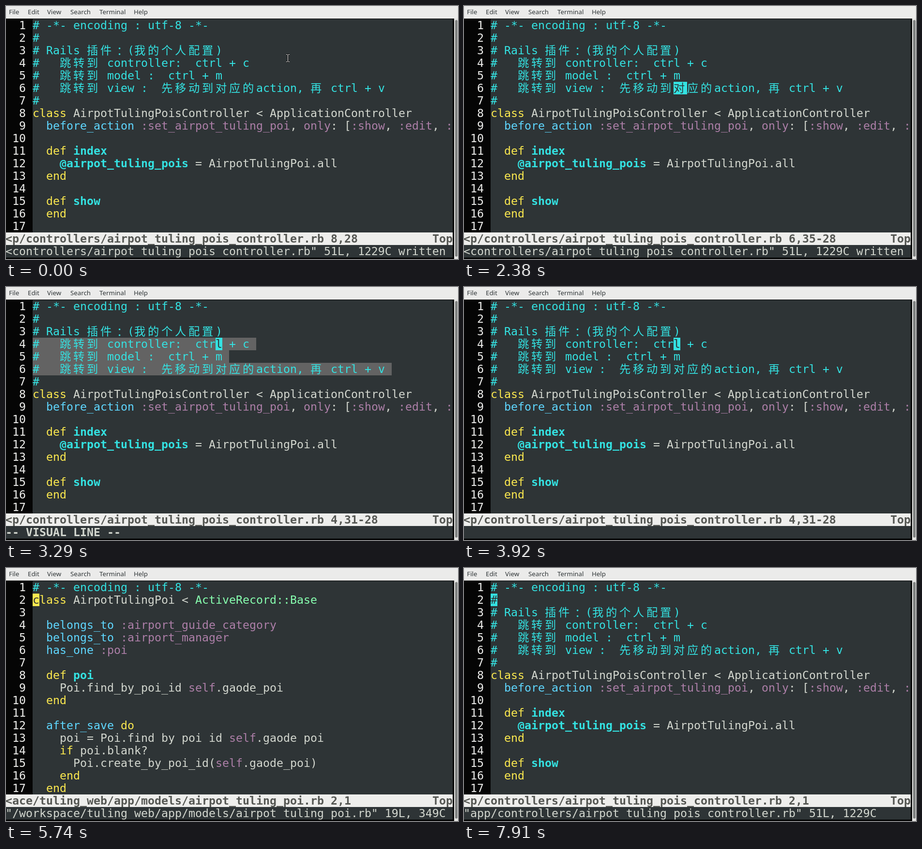
Write an HTML page that moves like this. It is 934 by 524 pixels and loops after 8 s.

```html
<!DOCTYPE html>
<html lang="zh-CN">
<head>
<meta charset="utf-8">
<title>Editor session</title>
<style>
  html, body { margin: 0; width: 100%; height: 100%; overflow: hidden; background: #050505; }
  #stage { position: relative; width: 934px; height: 524px; overflow: hidden; background: #050505; }
  #stage * { position: absolute; }
  #menu { left: 0; top: 0; width: 934px; height: 26px; background: #ebebea; color: #2e3436;
    font: 13.3px/25px "Noto Sans", sans-serif; }
  #bar { left: 926px; top: 26px; width: 8px; height: 498px; background: #e4e4e2; }
  #thumb { left: 2px; top: 3px; width: 5px; height: 490px; border-radius: 3px; background: #7c7e7d; }
  #term { left: -1px; top: 27px; width: 924px; height: 494px; overflow: hidden; background: #2e3436;
    font: 23.254px/26px "DejaVu Sans Mono", "Noto Sans CJK SC", "Noto Sans CJK JP", monospace; }
  #term span { white-space: pre; height: 26px; }
  #gutter { left: 0; top: 0; width: 56px; height: 442px; background: #050505; color: #eeeeec; }
  #status { left: 0; top: 442px; width: 924px; height: 26px; background: #eeeeec; color: #555753; font-weight: bold; }
  .pane, #marks { left: 56px; top: 0; width: 868px; height: 442px; }
  .mark { left: 0; height: 26px; background: #636363; }
  .mid { font-family: "Noto Sans CJK JP", sans-serif; }
  .w { color: #d3d7cf; }
  .c { color: #34e2e2; }
  .C { color: #34e2e2; font-weight: bold; }
  .y { color: #fce94f; }
  .b { color: #5fd7ff; }
  .p { color: #ad7fa8; }
  .g { color: #87ffaf; }
  #cursor { background: currentColor; overflow: hidden; }
  #cursor span { left: 0; top: 0; color: #2e3436; }
</style>
</head>
<body>
<div id="stage">
  <div id="menu"></div>
  <div id="bar"><div id="thumb"></div></div>
  <div id="term">
    <div id="gutter"></div>
    <div id="marks"></div>
    <div id="status"></div>
  </div>
  <svg id="mouse" style="left:576px;top:98px" width="13" height="20" fill="none">
    <path d="M3 2.5H5.5L6.5 3.5L7.5 2.5H10M6.5 3V17M3 17.5H5.5L6.5 16.5L7.5 17.5H10" stroke="#111" stroke-width="3"/>
    <path d="M3 2.5H5.5L6.5 3.5L7.5 2.5H10M6.5 3V17M3 17.5H5.5L6.5 16.5L7.5 17.5H10" stroke="#fff"/>
  </svg>
</div>
<script>
const CW = 14, RH = 26, LOOP = 8000;
const $ = id => document.getElementById(id);
const isWide = ch => ch > '\u2e7f';

function add(parent, tag, cls, x, y, text = '') {
  const el = document.createElement(tag);
  el.className = cls;
  el.style.left = x + 'px';
  el.style.top = y + 'px';
  el.textContent = text;
  return parent.appendChild(el);
}

// Each § is followed by the colour class of the run.
const files = {
  controller: {
    path: '<p/controllers/airpot_tuling_pois_controller.rb ',
    lines: [
      '§c# -*- encoding : utf-8 -*-',
      '§c#',
      '§c# Rails 插件：(我的个人配置)',
      '§c#   跳转到 controller:  ctrl + c',
      '§c#   跳转到 model :  ctrl + m',
      '§c#   跳转到 view :  先移动到对应的action, 再 ctrl + v',
      '§c#',
      '§yclass§w AirpotTulingPoisController < ApplicationController',
      '§w  §bbefore_action§w §p:set_airpot_tuling_poi§w, §ponly§w: [§p:show§w, §p:edit§w, §p:',
      '',
      '§w  §ydef§w §Cindex',
      '§w    §C@airpot_tuling_pois§w = AirpotTulingPoi.all',
      '§w  §yend',
      '',
      '§w  §ydef§w §Cshow',
      '§w  §yend',
      ''
    ]
  },
  model: {
    path: '<ace/tuling_web/app/models/airpot_tuling_poi.rb ',
    lines: [
      '§c# -*- encoding : utf-8 -*-',
      '§yclass§w AirpotTulingPoi < §gActiveRecord::Base',
      '',
      '§w  §bbelongs_to§w §p:airport_guide_category',
      '§w  §bbelongs_to§w §p:airport_manager',
      '§w  §bhas_one§w §p:poi',
      '',
      '§w  §ydef§w §Cpoi',
      '§w    Poi.find_by_poi_id §pself§w.gaode_poi',
      '§w  §yend',
      '',
      '§w  §bafter_save§w §ydo',
      '§w    poi = Poi.find by poi id §pself§w.gaode poi',
      '§w    §yif§w poi.blank?',
      '§w      Poi.create_by_poi_id(§pself§w.gaode_poi)',
      '§w    §yend',
      '§w  §yend'
    ]
  }
};

const written = '<controllers/airpot_tuling_pois_controller.rb" 51L, 1229C written';
const openModel = '"/workspace/tuling_web/app/models/airpot_tuling_poi.rb" 19L, 349C';
const openController = '"app/controllers/airpot_tuling_pois_controller.rb" 51L, 1229C';

// Only what changes is listed; the rest carries over.
const steps = [
  { t: 0, file: 'controller', pos: '8,28', msg: written, cursor: false, mouse: true, visual: 0 },
  { t: 420, cursor: true, mouse: false },
  { t: 560, pos: '9,28' },
  { t: 770, pos: '10,0-1' },
  { t: 910, pos: '11,11' },
  { t: 1610, pos: '10,0-1' },
  { t: 1750, pos: '9,28' },
  { t: 1960, pos: '8,28' },
  { t: 2100, pos: '7,1' },
  { t: 2380, pos: '6,35-28' },
  { t: 2660, msg: '-- VISUAL LINE --', visual: 6 },
  { t: 3150, pos: '5,31-28' },
  { t: 3290, pos: '4,31-28' },
  { t: 3780, msg: '', visual: 0 },
  { t: 4060, pos: '5,31-28' },
  { t: 4200, pos: '6,35-28' },
  { t: 4340, pos: '7,1' },
  { t: 4480, pos: '9,28' },
  { t: 4970, msg: openModel, cursor: false },
  { t: 5110, file: 'model', pos: '1,1', cursor: true },
  { t: 5740, pos: '2,1' },
  { t: 5950, pos: '3,0-1' },
  { t: 6160, pos: '4,1' },
  { t: 6370, pos: '5,1' },
  { t: 6510, pos: '6,1' },
  { t: 7070, msg: openController, cursor: false },
  { t: 7280, file: 'controller', pos: '1,1', cursor: true },
  { t: 7910, pos: '2,1' }
];
steps.forEach((s, i) => { steps[i] = { ...steps[i - 1], ...s }; });

// Lays one line out on the character grid and returns its cells.
function layLine(pane, line, row) {
  const cells = [];
  for (const run of line.split('§').slice(1)) {
    const cls = run[0];
    for (const part of run.slice(1).match(/[\u2e80-\uffff]|[^\u2e80-\uffff]+/g)) {
      const extra = part === '：' ? ' mid' : '';
      add(pane, 'span', cls + extra, cells.length * CW, row * RH, part);
      for (const ch of part) {
        cells.push({ ch, cls });
        if (isWide(ch)) cells.push(null);
      }
    }
  }
  return cells;
}

const term = $('term');
for (const file of Object.values(files)) {
  file.pane = add(term, 'div', 'pane', 56, 0);
  file.cells = file.lines.map((line, row) => layLine(file.pane, line, row));
}
for (let n = 1; n <= 17; n++)
  add($('gutter'), 'span', '', 0, (n - 1) * RH, String(n).padStart(3));

[['File', 6], ['Edit', 45], ['View', 85], ['Search', 133], ['Terminal', 193], ['Help', 264]]
  .forEach(([name, x]) => add($('menu'), 'span', '', x, 0, name));

const path = add($('status'), 'span', '', 0, 0);
add($('status'), 'span', '', 63 * CW, 0, 'Top');
const message = add(term, 'span', 'w', 0, 18 * RH + 1);
message.style.top = 18 * RH + 'px';
message.style.top = 468 + 'px';
const cursor = add(term, 'div', 'w', 0, 0);
cursor.id = 'cursor';
cursor.style.height = RH + 'px';
const glyph = add(cursor, 'span', '', 0, 0);

function show(s) {
  const file = files[s.file];
  const row = parseInt(s.pos) - 1;
  const col = s.pos.match(/\d+$/)[0] - 1;
  const cell = file.cells[row][col] || { ch: ' ', cls: 'w' };

  for (const f of Object.values(files)) f.pane.style.display = f === file ? '' : 'none';
  path.textContent = file.path + s.pos;
  message.textContent = s.msg;
  message.style.fontWeight = s.msg.startsWith('--') ? 'bold' : 'normal';
  $('mouse').style.display = s.mouse ? '' : 'none';

  cursor.className = cell.cls;
  cursor.style.display = s.cursor ? '' : 'none';
  cursor.style.left = 56 + col * CW + 'px';
  cursor.style.top = row * RH + 'px';
  cursor.style.width = (isWide(cell.ch) ? 2 : 1) * CW + 'px';
  glyph.textContent = cell.ch;

  $('marks').textContent = '';
  for (let r = row; r < s.visual; r++)
    add($('marks'), 'div', 'mark', 0, r * RH).style.width = (file.cells[r].length + 1) * CW + 'px';
}

const start = performance.now();
let current;
function tick() {
  const t = Math.max(0, performance.now() - start) % LOOP;
  const step = steps.filter(s => s.t <= t).pop();
  if (step !== current) show(current = step);
  requestAnimationFrame(tick);
}
tick();
</script>
</body>
</html>
```
